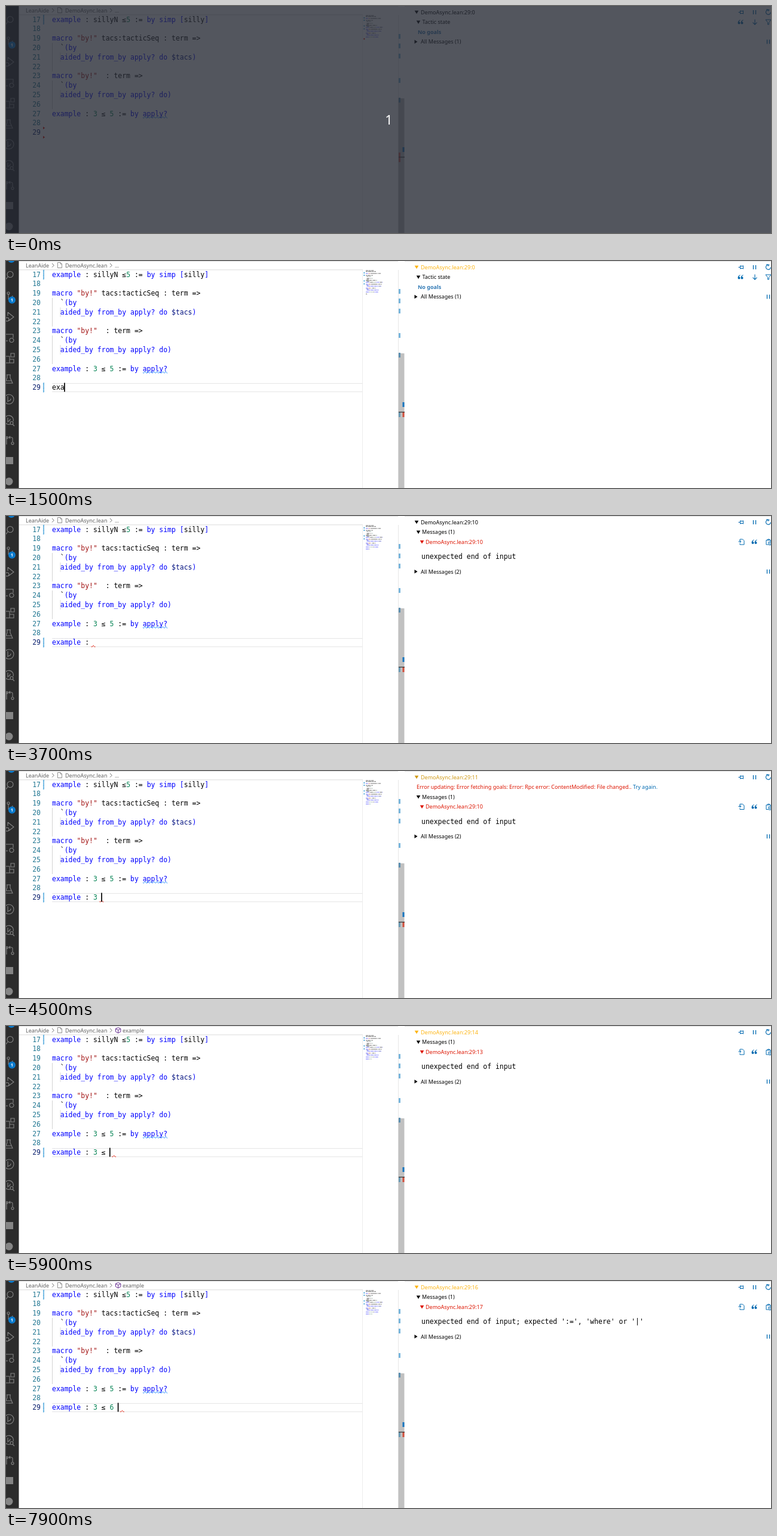
These frames come from a looping animation (1280 by 381 pixels, 8 s). An HTML page with a canvas:

```html
<!DOCTYPE html>
<html lang="en">
<head>
<meta charset="utf-8">
<title>Editor session</title>
<style>
html, body { margin: 0; width: 100%; height: 100%; overflow: hidden; background: #fff; }
canvas { display: block; width: 1280px; height: 381px; }
</style>
</head>
<body>
<canvas id="stage" width="1280" height="381"></canvas>
<script>
const g = document.getElementById('stage').getContext('2d');
const LOOP = 8000, CW = 6.897, LH = 15.79, LEFT = 77;
const MONO = '11.45px "DejaVu Sans Mono", monospace';
const UI = '9px "Noto Sans", "Open Sans", sans-serif';
const BLUE = '#0000ff', LINK = '#006ab1', GOLD = '#fdb515', RED = '#dd1500';

const code = [
  'example : sillyN ≤5 := by simp [silly]', '',
  'macro "by!" tacs:tacticSeq : term =>', '  `(by',
  '  aided_by from_by apply? do $tacs)', '',
  'macro "by!"  : term =>', '  `(by',
  '  aided_by from_by apply? do)', '',
  'example : 3 ≤ 5 := by apply?', ''
];
// lines above the visible ones, seen only in the minimap
const above = ['import Lean Tactic', 'open LeanAide Meta Elab', '', 'macro "by" tacs:tacticSeq : tactic',
  '', 'def sillyN : Nat', '  let n := 3', '', '  sillyN ≤ n + 5', '  silly', 'theorem silly : sillyN = 3', '  sillyN'];

// [time, value] steps
const typed = [[0, ''], [1000, 'e'], [1300, 'ex'], [1500, 'exa'], [1700, 'exam'],
  [2000, 'examp'], [2200, 'exampl'], [2300, 'example'], [2600, 'example '],
  [2900, 'example :'], [3100, 'example : '], [3900, 'example : 3'],
  [4400, 'example : 3 '], [4600, 'example : 3 \\'], [4800, 'example : 3 \\l'],
  [5000, 'example : 3 \\le'], [5100, 'example : 3 \\leq'],
  [5800, 'example : 3 ≤ '], [7300, 'example : 3 ≤ 6'], [7600, 'example : 3 ≤ 6 ']];
const position = [[0, 0], [3300, 10], [4100, 11], [4700, 12], [5100, 13],
  [5900, 14], [7400, 15], [7700, 16]];
const errorAt = [[0, 0], [3300, 10], [4700, 11], [5000, 13], [6000, 15],
  [7500, 16], [7700, 17]];
const headColor = [[0, '#000'], [1400, GOLD], [3400, '#000'], [3900, GOLD],
  [4400, '#d09a18'], [4600, GOLD], [6300, '#000'], [7400, GOLD]];
const symbol = [[0, false], [2600, true], [3200, false], [4900, true],
  [6400, false], [7000, true]];
const step = (list, t) => list.filter(s => s[0] <= t).pop();

function rect(x, y, w, h, color) { g.fillStyle = color; g.fillRect(x, y, w, h); }
function text(s, x, y, color, font = UI, align = 'left') {
  g.font = font; g.fillStyle = color; g.textAlign = align;
  g.fillText(s, x, y);
}
function path(d, color, width = 1, fill = false) {
  const p = new Path2D(d);
  if (fill) { g.fillStyle = color; g.fill(p); }
  else { g.strokeStyle = color; g.lineWidth = width; g.stroke(p); }
}
function disc(x, y, r, color) {
  g.beginPath(); g.arc(x, y, r, 0, 7); g.fillStyle = color; g.fill();
}
function icon(x, y, d, color, width = 1, fill = false) {
  g.save(); g.translate(x, y); path(d, color, width, fill); g.restore();
}
function wave(x, w, y, color) {
  g.beginPath();
  for (let i = 0; i <= w; i += 0.5) g.lineTo(x + i, y + 1.2 * Math.sin(i * 1.27));
  g.strokeStyle = color; g.lineWidth = 1; g.stroke();
}
function hatch(y) {
  rect(62, y, 2, 15.5, '#d3e9f6');
  for (let i = 0; i < 15; i += 2.4) path(`M62 ${y + i + 1.2}l2 -1`, '#2090d3', 1.1);
}

function tokenColor(s) {
  if (s[0] === '"') return '#a31515';
  if (/^\d+$/.test(s)) return '#098658';
  if (/^(example|macro|by|simp|aided_by|from_by|apply\?|do|[[\]()])$/.test(s)) return BLUE;
  return s[0] === '$' ? '#001080' : '#000';
}
const tokens = s => s.matchAll(/"[^"]*"|[\\$]?\w+\??|[^\s]/g);
function codeLine(s, y) {
  for (const m of tokens(s))
    text(m[0], LEFT + m.index * CW, y, tokenColor(m[0]), MONO);
}

function activityBar(t) {
  const c = '#858585';
  rect(0, 0, 21.5, 381, '#2c2c2c');
  if (t >= 1400) disc(9, -3, 6, '#0a7acc');
  icon(6, 22.5, 'M6 0a5 5 0 1 1 -10 0a5 5 0 1 1 10 0M-2.5 3.5L-7 9', c, 1.1);
  icon(3, 59, 'M3 -5a2 2 0 1 1 -4 0a2 2 0 1 1 4 0M1 -3v9M8 -1q0 4 -7 5', c, 1.1);
  disc(10, 65.5, 6, '#0a7acc');
  text('1', 10, 68.4, '#fff', 'bold 7.5px "Noto Sans", sans-serif', 'center');
  icon(4, 94, 'M-1 -8L9 0L1 6M-1 -8v6M1 4a3 3 0 1 1 -6 0a3 3 0 1 1 6 0', c, 1.1);
  icon(4, 129, 'M-6 -6h14v6M-6 5h5M9 4a3.5 3.5 0 1 1 -7 0a3.5 3.5 0 1 1 7 0', c, 1.1);
  icon(4, 163, 'M-5 -3h7v11h-7M2 2h7v6h-7M4 -8h6v6h-6z', c, 1.1);
  icon(4, 198, 'M-3 -7h7M-2 -7v5l-4 9h13l-4 -9v-5M-4 3h9', c, 1.1);
  icon(4, 232, 'M9 0a8 8 0 1 1 -16 0a8 8 0 1 1 16 0M-1 -5v10M-1 3q5 0 5 -4', c, 1.1);
  icon(4, 267, 'M3 7a7.5 7.5 0 1 1 5 -5M-1 -4v8M-1 2q4 0 4 -4M8 5a2.5 2.5 0 1 1 -5 0a2.5 2.5 0 1 1 5 0M7 7l3 3', c, 1.1);
  icon(4, 301, 'M-3 -6v13M-1 -6h-4v3h4zM0 -5h5q2 0 2 2v6M9 5a2 2 0 1 1 -4 0a2 2 0 1 1 4 0M3 -7l-2 2l2 2', c, 1.1);
  rect(0, 329, 12, 12, c);
  disc(5, 370, 6.5, c);
}

function breadcrumb(t) {
  const c = '#616161';
  rect(22, 0, 634, 1, '#e0e0e0');
  text('LeanAide', 33, 10.6, c);
  path('M77 4l3.2 3.3l-3.2 3.3M174 4l3.2 3.3l-3.2 3.3', c, 0.9);
  path('M86.5 2.5h4.5l2.5 2.5v6.5h-7zM91 2.5v2.5h2.5', '#777', 0.8);
  text('DemoAsync.lean', 99, 10.6, c);
  if (step(symbol, t)[1]) {
    path('M187.7 2.6l4.2 2v5l-4.2 2.2l-4.2 -2.2v-5zM183.5 4.6l4.2 2.1l4.2 -2.1M187.7 6.7v5', '#652d90', 1);
    text('example', 195, 10.6, c);
  } else text('…', 182, 10.6, c);
  rect(22, 14, 575, 1, '#e6e6e6');
  rect(22, 15, 575, 1, '#f4f4f4');
}

function minimap(t, line) {
  rect(596, 15, 1, 366, '#ececec');
  g.globalAlpha = 0.55;
  [...above, ...code, line].forEach((s, i) => {
    for (const m of tokens(s))
      rect(602 + m.index * 0.74, 15.5 + i * 1.64, m[0].length * 0.74, 1, tokenColor(m[0]));
  });
  g.globalAlpha = 1;
  for (const y of [19, 23, 32.5, 37.5]) rect(598.5, y, 1.7, 1.8, '#2090d3');
  if (t < 1000) rect(598.5, 54, 1.7, 2.4, '#e51400');
}

function ruler(t) {
  rect(656, 15, 1, 366, '#e6e6e6');
  rect(656.5, 155, 10, 226, '#c1c1c1');
  for (const y of [47, 63, 80, 121]) rect(657, y, 3, 8, '#78b6dc');
  rect(657, 154, 3, 8, '#5c8fb0');
  rect(663.5, 237, 3, 8, '#1876bf');
  if (t < 1400) rect(657, 246, 3, 16, '#c4605a');
  else {
    rect(657, 253, 3, 9, '#6c9bb5');
    rect(663.5, 253, 3, 9, '#d4503c');
  }
  rect(657, 253, 10, 1.2, '#333');
}

function popup(x) {
  rect(x, 221, 310, 49, '#c8c8c8');
  rect(x + 0.8, 221, 308.4, 48.2, '#f3f3f3');
  rect(x + 0.8, 221, 308.4, 16, '#0060c0');
  rect(x + 0.8, 253, 308.4, 16.2, '#e8e8e8');
  // "*" toggles the matched style
  ['*\\leq*q', '*\\*triang*leq', '*\\*b*l*acks*q*uar*e'].forEach((row, i) => {
    const y = 233 + i * 15.8;
    text('abc', x + 3, y - 1.3, i ? '#555' : '#fff', '6.5px "Noto Sans", sans-serif');
    let col = 0;
    row.split('*').forEach((part, k) => {
      const hit = k % 2;
      text(part, x + 17 + col * CW, y, i ? (hit ? '#0066bf' : '#000') : (hit ? '#bbe7ff' : '#fff'),
        (hit ? 'bold ' : '') + MONO);
      col += part.length;
    });
  });
  text('≤', x + 296, 233, '#fff', MONO);
}

function editor(t) {
  const [since, line] = step(typed, t);
  const end = LEFT + line.length * CW;
  breadcrumb(t);
  rect(77, 62, 1, 48, '#d3d3d3');
  rect(77, 125, 1, 48, '#d3d3d3');
  rect(90.5, 78, 1, 16, '#dcdcdc');
  rect(90.5, 141, 1, 16, '#dcdcdc');
  if (t >= 100) {
    const c = t < 1000 ? '#dbe4ec' : '#e5e5e5';
    rect(LEFT, 205, 519, 1, c);
    rect(LEFT, 219, 519, 1, c);
    if (t < 1000) rect(LEFT, 205, 1, 14, c);
  }
  g.save();
  g.beginPath(); g.rect(22, 15, 574, 366); g.clip();
  [...code, line].forEach((s, i) => {
    const y = 26.6 + i * LH;
    text(17 + i, 58, y, i === 12 ? '#0b216f' : '#237893', MONO, 'right');
    codeLine(s, y);
  });
  g.restore();
  wave(229, 41, 187, '#1a85ff');
  hatch(15);
  if (t < 1000) {
    path('M62 202.5l3.2 2.2l-3.2 2.2zM62 218l3.2 2.2l-3.2 2.2z', '#e51400', 1, true);
  } else hatch(204.5);
  if (t >= 2600) wave(end + (t >= 5900 ? 0.5 : -0.5) * CW, 7, 218.6, '#e51400');
  const slash = line.indexOf('\\');
  if (slash > 0) rect(LEFT + slash * CW, 217.5, end - LEFT - slash * CW, 1, '#222');
  const blink = t < 1000 ? t >= 500 : (t - since) % 1000 < 500;
  if (blink) rect(end - 0.6, 204.5, 1.7, 15, '#000');
  minimap(t, line);
  ruler(t);
  if (t >= 5100 && t < 5800) popup(187);
}

const down = (x, y, c) => path(`M${x - 3.3} ${y - 2.5}h6.6l-3.3 5.4z`, c, 1, true);
const right = (x, y) => path(`M${x - 2} ${y - 3.2}l5 3.2l-5 3.2z`, '#000', 1, true);
const pause = (x, y) => path(`M${x - 2} ${y - 3.5}v7M${x + 2} ${y - 3.5}v7`, LINK, 1.3);
const quote = (x, y) => icon(x, y,
  'M-.5 -4q-4 1.5 -4 5.5a2 2 0 1 0 2 -2q0 -1.5 2 -2.4zM4.5 -4q-4 1.5 -4 5.5a2 2 0 1 0 2 -2q0 -1.5 2 -2.4z',
  LINK, 1, true);

function allMessages(n, y) {
  right(685.5, y);
  text(`All Messages (${n})`, 694, y + 3.3, '#000');
  pause(1275.5, y);
}
function panel(t) {
  rect(667, 0, 613, 1, '#e0e0e0');
  const col = step(position, t)[1], err = step(errorAt, t)[1], c = step(headColor, t)[1];
  down(687, 10.3, c);
  text(`DemoAsync.lean:29:${col}`, 694, 13.6, c);
  icon(1230, 10.5, 'M-4.5 0h3M-1.5 -3v6M-1.5 -2h5M-1.5 2h5M3.5 -3v6', LINK, 1);
  pause(1252.5, 10.5);
  icon(1275.5, 10.5, 'M2 -3.6a4 4 0 1 0 2 3.6M-3.5 -4.5h3.2v3', LINK, 1.1);
  if (!err) {
    down(690, 27, '#000');
    text('Tactic state', 696.5, 30.3, '#000');
    text('No goals', 689, 46.8, '#3079b5', 'bold ' + UI);
    quote(1229, 27);
    icon(1253, 27, 'M0 -4.5v8.5M-3.5 .7L0 4.2L3.5 .7', LINK, 1.1);
    icon(1275.5, 27, 'M-4.5 -4h9l-3.5 4.5v3.5h-2v-3.5z', LINK, 1);
    allMessages(t < 2600 ? 1 : 2, 60);
    return;
  }
  let y = 27;
  if (t >= 4200 && t < 4600) {
    const s = 'Error updating: Error fetching goals: Error: Rpc error: ContentModified: File changed.. ';
    text(s, 687, y + 3.3, RED);
    text('Try again.', 687 + g.measureText(s).width, y + 3.3, LINK);
    y += 16.5;
  }
  down(690, y, '#000');
  text('Messages (1)', 696, y + 3.3, '#000');
  y += 16.5;
  down(696, y, RED);
  text(`DemoAsync.lean:29:${err}`, 702, y + 3.3, RED);
  icon(1230.5, y, 'M-2.5 -1v-3.5h4.5l2.5 2.5v6.5h-7v-2M-5 -.5h4M-2.7 -2.5l2 2l-2 2', LINK, 1);
  quote(1252, y);
  icon(1276, y, 'M-1 4.5h-3v-7.5h7.5v2M-1.5 -3v-1.5h3v1.5M0 0h4v5h-4zM1 2.5h2', LINK, 1);
  const more = t >= 7500 ? "; expected ':=', 'where' or '|'" : '';
  text('unexpected end of input' + more, 695, y + 28.5, '#000', MONO);
  allMessages(2, y + 49.7);
}

function draw(t) {
  rect(0, 0, 1280, 381, '#fff');
  activityBar(t);
  editor(t);
  panel(t);
  if (t < 100) {
    rect(0, 0, 1280, 381, 'rgba(36,40,50,0.785)');
    text('1', 640.5, 198.5, '#fff', '500 22px "Noto Sans", sans-serif', 'center');
  }
}

const start = performance.now();
function tick() {
  draw((performance.now() - start) % LOOP);
  requestAnimationFrame(tick);
}
tick();
</script>
</body>
</html>
```
